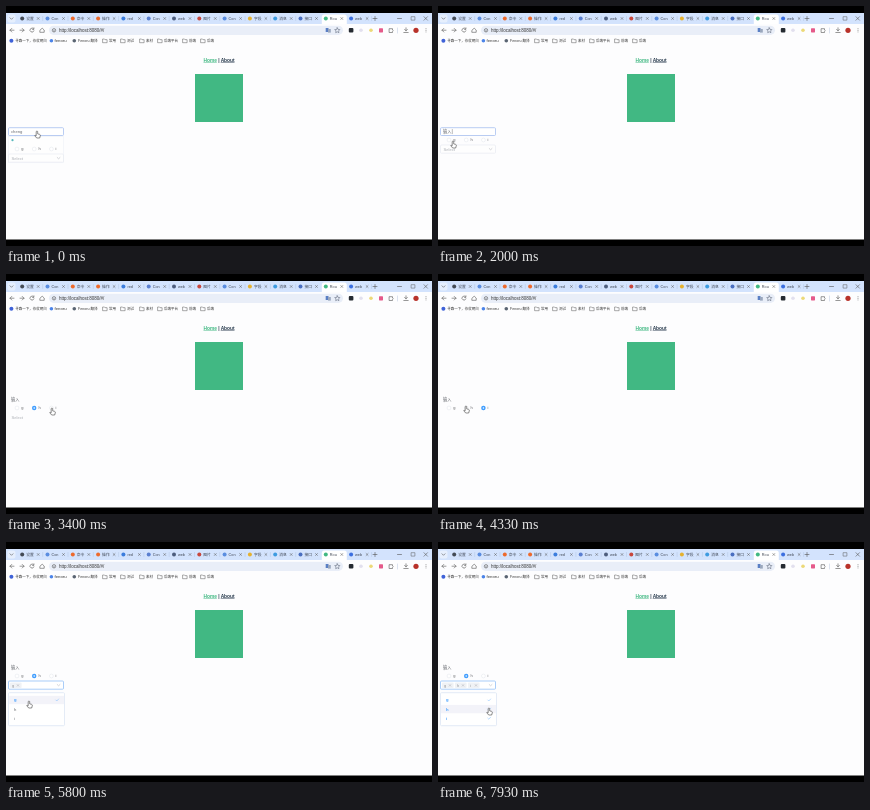
Write an HTML page that moves like this. It is 426 px wide and 240 px high and loops after 8000 ms.

```html
<!DOCTYPE html>
<html lang="zh">
<head>
<meta charset="utf-8">
<title>Form demo</title>
<style>
  html, body { margin: 0; width: 100%; height: 100%; overflow: hidden; background: #000; }
  svg { display: block; width: 100%; height: 100%; }
  text { font-family: "Liberation Sans", "Noto Sans CJK SC", "Noto Sans CJK", sans-serif; white-space: pre; }
  .line { fill: none; stroke-linecap: round; stroke-linejoin: round; }
</style>
</head>
<body>
<svg id="stage" viewBox="0 0 426 240"></svg>
<script>
const LOOP = 8000, STEP = 1000 / 15;
const stage = document.getElementById('stage');

const rect = (x, y, w, h, fill, more = '') =>
  `<rect x="${x}" y="${y}" width="${w}" height="${h}" fill="${fill}" ${more}/>`;
const dot = (x, y, r, fill, more = '') =>
  `<circle cx="${x}" cy="${y}" r="${r}" fill="${fill}" ${more}/>`;
const text = (x, y, s, size, fill, more = '') =>
  `<text x="${x}" y="${y}" font-size="${size}" fill="${fill}" ${more}>${s}</text>`;
const line = (d, color = '#555', width = .6, more = '') =>
  `<path class="line" d="${d}" stroke="${color}" stroke-width="${width}" ${more}/>`;
const group = (id, body) => `<g id="${id}">${body}</g>`;
const cross = (x, y, r, color) =>
  line(`M${x - r} ${y - r}l${2 * r} ${2 * r}m0 ${-2 * r}l${-2 * r} ${2 * r}`, color, .5);
const box = (x, y, w, h, stroke, fill = '#fff') =>
  rect(x, y, w, h, fill, `rx="1" stroke="${stroke}" stroke-width=".7"`);

function tabs() {
  const items = [
    ['#444b55', '设置'], ['#5a8de0', 'Con'], ['#ed6a2c', '命令'], ['#ed6a2c', '操作'],
    ['#3b7ddd', 'red'], ['#5a7fd0', 'Con'], ['#4d5d7d', 'web'], ['#c8473d', '图片'],
    ['#5a8de0', 'Con'], ['#e5b12f', '字段'], ['#3d9be0', '消息'], ['#4a6fc0', '接口'],
    ['#41b883', 'Rou'], ['#3b6fe0', 'web']
  ];
  let out = rect(0, 7, 426, 12, '#d3e3fd') + rect(1.5, 8.5, 8, 8, '#e6effd', 'rx="2"') +
    line('M4 11.8l1.5 1.5 1.5-1.5');
  items.forEach(([color, name], i) => {
    const x = 16.2 + i * 25.3;
    if (i === 12) out += rect(x - 4, 8.5, 25, 12, '#fff', 'rx="2.5"');
    else if (i !== 11) out += line(`M${x + 20.5} 10.5v4`, '#a9bddb', .4);
    out += dot(x, 12.5, 2, color) + text(x + 4, 13.9, name, 3.8, '#3c4350') +
      cross(x + 16, 12.5, 1, '#555');
  });
  return out + line('M367 12.5h4m-2-2v4M391.5 12.5h4M418 10.7l3.5 3.5m0-3.5l-3.5 3.5') +
    line('M405.5 10.7h3.4v3.4h-3.4z', '#555', .5);
}

function toolbar() {
  let out = rect(0, 18, 426, 22, '#fdfdfe') + rect(43, 19.7, 294, 9.2, '#e9eef8', 'rx="4.6"');
  out += line('M8 24.2H4m1.8-1.8L4 24.2 5.8 26M14 24.2h4m-1.8-1.8l1.8 1.8-1.8 1.8');
  out += line('M27.7 23a2 2 0 1 0 .2 1.8M27.9 21.8v1.5h-1.5M34.2 24l2-1.8 2 1.8v2.3h-4z');
  out += dot(48, 24.3, 1.7, 'none', 'stroke="#555" stroke-width=".6"') + line('M48 24.2v.9');
  out += text(53, 25.8, 'http://localhost:8080/#/', 4.5, '#333');
  out += rect(319.7, 22, 2.8, 4, '#5a7fc4') + rect(322, 23, 2.8, 3.6, '#9aa7bd');
  out += line('M331.3 21.8l.8 1.6 1.8.2-1.3 1.3.3 1.8-1.6-.9-1.6.9.3-1.8-1.3-1.3 1.8-.2z', '#4a5568', .5);
  out += rect(342.8, 22, 4.6, 4.6, '#252a31', 'rx="1"') + dot(355, 24.3, 1.8, '#e2e0ee') +
    dot(365, 24.3, 1.8, '#ecd978') + rect(373, 22.2, 4, 4.2, '#e55a8a', 'rx=".6"');
  out += line('M383.5 22.7h3v1.2q1.5.5 0 1.4v1.2h-3z') + line('M391.5 22v5', '#b8c7e0', .5);
  out += line('M400 21.8v3m-1.4-1.4l1.4 1.4 1.4-1.4M397.8 26.5h4.4') + dot(410, 24.3, 2.6, '#b8322a');
  return out + [22.7, 24.3, 25.9].map(y => dot(420, y, .45, '#444')).join('');
}

function bookmarks() {
  const folders = [[99, '常用'], [117, '测试'], [136, '素材'], [154, '后端平台'], [179, '前端'], [197, '后端']];
  let out = dot(5.4, 34.8, 2, '#3f62d8') + text(9.2, 36.2, '寻路一下，你就明白', 3.5, '#333');
  out += dot(45.4, 34.8, 1.8, '#4c84e8') + text(48.5, 36.2, 'fenoru', 4.3, '#333');
  out += dot(68.3, 34.8, 1.8, '#5a6472') + text(72, 36.2, 'Fenoru 翻译', 3.6, '#333');
  for (const [x, name] of folders)
    out += line(`M${x - 2} 33h1.5l.6.7h2v3h-4.1z`, '#555', .5) + text(x + 4, 36.2, name, 3.5, '#333');
  return out;
}

function page() {
  const home = '<tspan fill="#42b983" text-decoration="underline">Home</tspan>';
  const about = '<tspan font-weight="700" text-decoration="underline">About</tspan>';
  return text(213, 55.5, `${home} | ${about}`, 4.8, '#2c3e50', 'text-anchor="middle" font-weight="700"') +
    rect(189, 68, 48, 48, '#41b883');
}

const options = ['g', 'h', 'i'];

function form() {
  const radios = options.map((name, i) => {
    const x = 11 + i * 17.2;
    return dot(x, 134, 1.9, '#fff', 'stroke="#e1e4eb" stroke-width=".5"') +
      group('radio' + i, dot(x, 134, 2.2, '#409eff') + dot(x, 134, .8, '#fff')) +
      text(x + 4.2, 135.4, name, 4, '#606266');
  }).join('');
  const tags = options.map((name, i) => group('tag' + i,
    rect(4 + i * 13, 140.6, 11.6, 5.4, '#f0f2f5', 'rx=".8"') +
    text(6 + i * 13, 144.6, name, 4, '#909399') + cross(12 + i * 13, 143.4, .8, '#a8abb2'))).join('');
  const list = options.map((name, i) => {
    const y = 158 + i * 9.1;
    return group('hover' + i, rect(3, y - 4.2, 55, 8.4, '#f3f3f9')) +
      group('plain' + i, text(8, y + 1.4, name, 4.2, '#606266')) +
      group('picked' + i, text(8, y + 1.4, name, 4.2, '#409eff', 'font-weight="700"') +
        line(`M49.8 ${y}l1 1 1.8-2`, '#79b8ff', .5));
  }).join('');
  return group('focus', box(2.5, 121.7, 55, 7.8, '#9db8ee')) +
    `<text id="entry" x="5" y="127.2" font-size="4.2" fill="#66696f"></text>` +
    group('caret', line('M14.3 123.5v4.2', '#555', .4)) +
    group('hint', rect(2.5, 130.4, 55, 26.4, '#fefefe', 'stroke="#eceff5" stroke-width=".5"') +
      dot(6.5, 134.2, 1.1, '#57b8bd')) +
    group('rows', radios + group('frame', box(2.5, 139, 55, 8.2, '#e7eaf1', '#fefefe')) +
      group('active', box(2.5, 139, 55, 8.2, '#86b8f5')) +
      group('placeholder', text(5.5, 144.5, 'Select', 4.1, '#a8abb2')) +
      group('chevron', line('M51.2 142.5l1.4 1.3 1.4-1.3', '#a8abb2', .5)) + tags) +
    group('menu', box(2.5, 150.7, 56, 33, '#d9e3f2') + list);
}

const pointer = '<g id="pointer"><path d="M-.8 2.8V-1.5q.8-1.1 1.5 0V.9l2 .5q.8.3.6 1.3L2.7 5H-.3l-2-2.3q.2-1.1 1.5.1z" ' +
  'fill="#fff" stroke="#333" stroke-width=".55"/></g>';

stage.innerHTML = rect(0, 0, 426, 240, '#000') + rect(0, 7, 426, 226.5, '#fdfdfe') +
  tabs() + toolbar() + bookmarks() + page() + form() + pointer;

const el = Object.fromEntries([...stage.querySelectorAll('[id]')].map(n => [n.id, n]));
const show = (id, on) => el[id].style.display = on ? '' : 'none';

// Pointer stops: time, x, y.
const stops = [
  [0, 31, 127], [1300, 31, 127], [1900, 15, 137], [2350, 15, 137], [2650, 29, 135],
  [3000, 29, 135], [3350, 46, 136], [3850, 46, 136], [4250, 28, 134], [4600, 28, 134],
  [5000, 33, 143], [5250, 33, 143], [5550, 23, 161], [5900, 23, 161], [6200, 24, 169],
  [6450, 24, 169], [6700, 25, 179], [7200, 25, 179], [7650, 51, 168], [LOOP, 51, 168]
];
// Radio choices and tag choices by time.
const choices = [[0, -1], [2250, 0], [2850, 1], [3600, 2], [4450, 1]];
const picks = [5650, 6300, 6800];

function pointerAt(t) {
  const i = stops.findIndex(s => s[0] > t);
  const [t0, x0, y0] = stops[i - 1], [t1, x1, y1] = stops[i];
  const u = (t - t0) / (t1 - t0), e = u * u * (3 - 2 * u);
  return [x0 + (x1 - x0) * e, y0 + (y1 - y0) * e];
}

function draw(t) {
  const composing = t < 900, open = t >= 5200, focused = t < 2250;
  const [x, y] = pointerAt(t);
  const choice = choices.filter(c => c[0] <= t).pop()[1];

  el.entry.textContent = composing ? 'cheng' : '输入';
  show('focus', focused);
  show('caret', focused && !composing && t % 1000 < 500);
  show('hint', composing);
  el.rows.setAttribute('transform', `translate(0 ${composing ? 9 : 0})`);
  show('frame', t < 2700);
  show('active', open);
  show('placeholder', t < 3900 || t >= 5000 && t < picks[0]);
  show('chevron', t < 2700 || open);
  show('menu', open);
  options.forEach((_, i) => {
    const picked = t >= picks[i];
    show('radio' + i, choice === i);
    show('tag' + i, picked);
    show('picked' + i, picked);
    show('plain' + i, !picked);
    show('hover' + i, Math.abs(y + .5 - (158 + i * 9.1)) < 4.55);
  });
  el.pointer.setAttribute('transform', `translate(${x} ${y})`);
}

const start = performance.now();
function tick() {
  const t = (performance.now() - start) % LOOP;
  draw(Math.floor(t / STEP) * STEP);
  requestAnimationFrame(tick);
}
tick();
</script>
</body>
</html>
```
